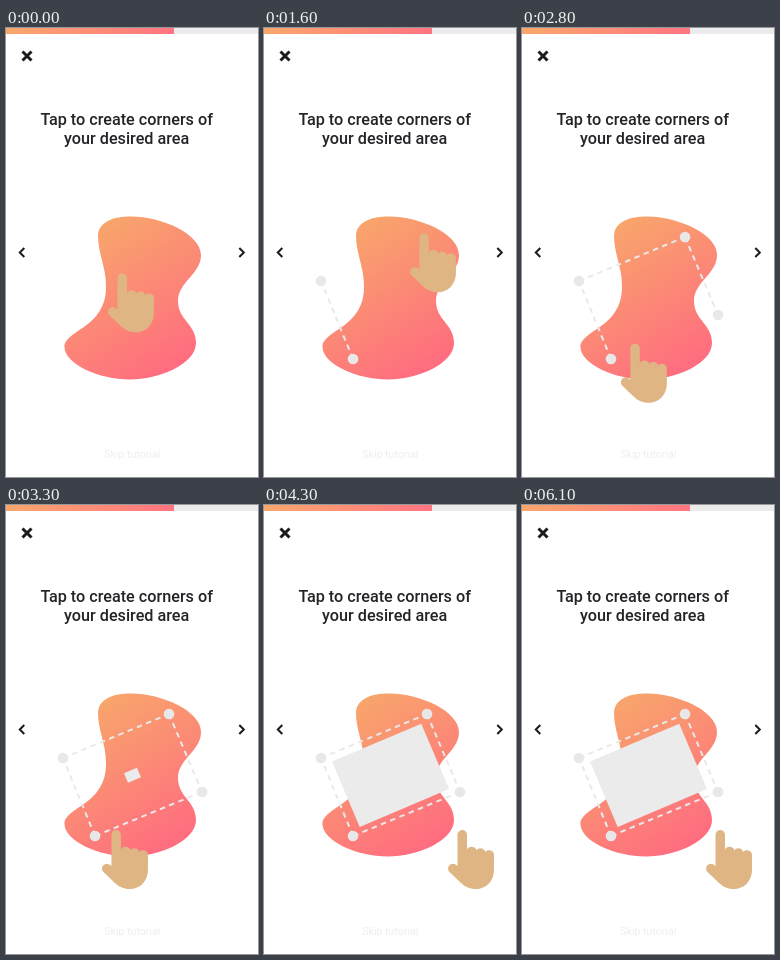
An HTML page for the animation above (6200 ms loop, 252 by 449 pixels).

```html
<!DOCTYPE html>
<html lang="en">
<head>
<meta charset="utf-8">
<title>Area tutorial</title>
<style>
  html, body { margin: 0; width: 100%; height: 100%; overflow: hidden; background: #fff; }
  svg { display: block; width: 100%; height: 100%; }
  text { font-family: Roboto, sans-serif; text-anchor: middle; }
  .title { font-size: 16.2px; font-weight: 500; fill: #242428; }
  .skip { font-size: 10.6px; fill: #eee; }
  .icon { fill: none; stroke: #1c1c1c; }
</style>
</head>
<body>
<svg viewBox="0 0 252 449">
  <defs>
    <linearGradient id="warm" gradientUnits="userSpaceOnUse" x1="85" y1="200" x2="175" y2="340">
      <stop offset="0" stop-color="#f8a66b"/>
      <stop offset="1" stop-color="#ff6b80"/>
    </linearGradient>
    <linearGradient id="bar">
      <stop offset="0" stop-color="#f9a86c"/>
      <stop offset="1" stop-color="#ff7482"/>
    </linearGradient>
  </defs>
  <rect width="252" height="6" fill="#ebebeb"/>
  <rect width="168" height="6" fill="url(#bar)"/>
  <path class="icon" stroke-width="3" d="M16.5 23.5l9 9m0-9l-9 9"/>
  <path class="icon" stroke-width="2" d="M18.3 220l-4.5 4.5 4.5 4.5M233.3 220l4.5 4.5-4.5 4.5"/>
  <text class="title" x="120.7" y="97">Tap to create corners of</text>
  <text class="title" x="120.7" y="116">your desired area</text>
  <text class="skip" x="126.3" y="430">Skip tutorial</text>
  <path fill="url(#warm)" d="M122 188.5C152 187 195 205 195 227C195 246 172 254 172 273C172 292 190 296 190 315C190 336 153 351.5 124 351.5C93 351.5 58.5 336 58.5 319C58.5 302 100 300 100 259C100 238 92 226 92 208C92 196 104 189 122 188.5Z"/>
  <g id="edges" stroke="#e9e9e9" stroke-width="2" stroke-dasharray="5.5 4.5"/>
  <g id="dots" fill="#e8e8e8"/>
  <rect id="area" x="-48.5" y="-35.5" width="97" height="71" fill="#ebebeb"/>
  <path id="hand" fill="#deb583" d="M-4.5 4.8A4.7 4.7 0 0 1 5 4.8V20C6 15.5 14 16 14.5 20.5C16 17 22.5 17.5 23.3 22C25 19 32 19.5 32 25V40C32 51 24 59 14 59C7 59 3 56.5-1 53L-13 41.5C-16 37-11 31.5-6.5 34.5L-4.5 36Z"/>
</svg>
<script>
const LOOP = 6200, MOVE = 540;
const corners = [[89, 331], [57, 253], [163, 209], [196, 287]];
const taps = [430, 1080, 1700, 2360];
const closeAt = 3010;

// Fingertip stops and the midpoint time of the move that reaches each
const start = [121.5, 229];
const moves = [
  [125, 89, 325], [790, 57, 247], [1390, 163, 204],
  [2050, 196, 283], [2700, 89, 325], [3415, 198, 325]
];
// Area pop: time, scale, tilt
const pop = [
  [3230, 0, 0], [3300, .145, 0], [3450, .8, 0], [3650, 1.65, -25],
  [3850, .85, 4], [4020, 1.06, 0], [4200, 1, 0]
];

const $ = id => document.getElementById(id);
const clamp = v => Math.min(1, Math.max(0, v));
const ease = p => (1 - Math.cos(Math.PI * clamp(p))) / 2;
const mix = (a, b, p) => a + (b - a) * p;

function add(parent, tag, attrs) {
  const el = document.createElementNS("http://www.w3.org/2000/svg", tag);
  for (const k in attrs) el.setAttribute(k, attrs[k]);
  return $(parent).appendChild(el);
}

const dots = corners.map(([cx, cy]) => add("dots", "circle", { cx, cy }));
const edges = corners.map(([x1, y1], i) => {
  const [x2, y2] = corners[(i + 1) % 4];
  return add("edges", "line", { x1, y1, x2, y2 });
});

function handAt(t) {
  let [x, y] = start;
  for (const [mid, tx, ty] of moves) {
    const p = ease((t - mid) / MOVE + .5);
    x = mix(x, tx, p);
    y = mix(y, ty, p);
  }
  return [x, y];
}

function popAt(t) {
  for (let i = 1; i < pop.length; i++) {
    const [a, s, r] = pop[i - 1], [b, s2, r2] = pop[i];
    if (t < b) {
      const p = ease((t - a) / (b - a));
      return [mix(s, s2, p), mix(r, r2, p)];
    }
  }
  return [1, 0];
}

function draw(t) {
  dots.forEach((d, i) => d.setAttribute("r", 5.3 * clamp((t - taps[i]) / 100)));
  edges.forEach((e, i) => {
    e.setAttribute("opacity", clamp((t - (taps[i + 1] || closeAt)) / 100));
  });
  const [scale, tilt] = popAt(t);
  $("area").setAttribute("transform", `translate(126.5 270.3) rotate(${tilt - 23}) scale(${scale})`);
  $("hand").setAttribute("transform", `translate(${handAt(t)})`);
}

const begin = performance.now();
function tick() {
  draw((performance.now() - begin) % LOOP);
  requestAnimationFrame(tick);
}
draw(0);
requestAnimationFrame(tick);
</script>
</body>
</html>
```
